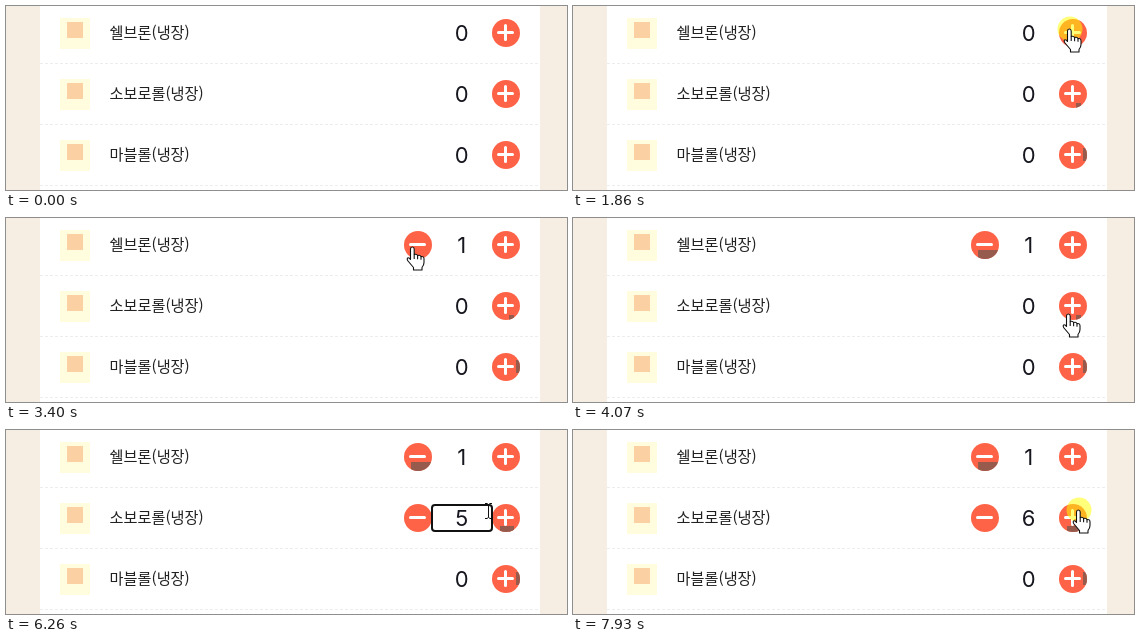
Recreate the animation shown at these times as an HTML page. Size 561x184 px, loop 7990 ms.

```html
<!DOCTYPE html>
<html lang="ko">
<head>
<meta charset="utf-8">
<style>
  html, body { margin: 0; width: 100%; height: 100%; overflow: hidden; background: #fff; }
  svg { display: block; }
  .name { font: 400 15.2px "Noto Sans CJK KR", "Noto Sans CJK", sans-serif; fill: #212121; }
  .count { font: 400 22px Inter, sans-serif; fill: #171720; text-anchor: middle; }
</style>
</head>
<body>
<svg width="561" height="184" viewBox="0 0 561 184">
  <defs>
    <clipPath id="disc"><circle r="14"/></clipPath>
  </defs>
  <rect width="561" height="184" fill="#f7eee3"/>
  <rect x="34" width="500" height="184" fill="#fff"/>
  <g id="rows"></g>
  <circle id="glow" r="12.5" fill="#ff0" fill-opacity=".52"/>
  <g id="hand" fill="#fff" stroke="#111" stroke-width="1.1" stroke-linejoin="round">
    <path d="M-2.5 12.5V2Q-2.5 0-.7 0T1.2 2V7.5Q4 6.8 4.6 8.6Q7.2 7.6 8 9.6Q11 9 11 11.8V15.5Q11 18 9 20.5V23H.5V20.5L-5 14Q-6.6 11.4-5 10.7Q-3.6 10.5-2.5 12.5Z"/>
    <path d="M1.2 7.5V12M4.6 8.6V12.3M8 9.6V12.8" fill="none"/>
  </g>
  <path id="arrow" d="M.5.5V16.5L4.2 13L6.7 18.8L9.2 17.7L6.8 12.1H11.8Z" fill="#fff" stroke="#111"/>
  <path id="beam" d="M-3-7.5H-1L.5-6.5L2-7.5H4M-3 7.5H-1L.5 6.5L2 7.5H4M.5-6.5V6.5" fill="none" stroke="#111"/>
</svg>
<script>
const LOOP = 7990, TICK = LOOP / 120;
const PRESS = 130, BLINK = 530;
const PLUS_X = 500, MINUS_X = 412, COUNT_X = 455.7;
const FOCUS = 4600, TYPED = 5600, BLUR = 7050;

const names = ['쉘브론(냉장)', '소보로롤(냉장)', '마블롤(냉장)'];
const clicks = [
  { t: 1860, row: 0, add: 1 },
  { t: 2190, row: 0, add: 1 },
  { t: 3270, row: 0, add: -1 },
  { t: FOCUS, row: 1, add: 0 },
  { t: 6980, row: 1, add: 1 },
  { t: 7930, row: 1, add: 1 }
];

// Pointer stops; each is reached from the one before
const stops = [
  { end: 860, x: 514, y: 160 },
  { start: 860, end: 1260, x: 497, y: 23 },
  { start: 2665, end: 3130, x: 407, y: 29 },
  { start: 3605, end: 4070, x: 496, y: 96 },
  { start: 4070, end: 4400, x: 460, y: 87 },
  { start: 6065, end: 6530, x: 519, y: 70 },
  { start: 6530, end: 6910, x: 506, y: 80 }
];

// Shaded patches the pointer leaves on buttons
const smudges = [
  { row: 2, kind: 'plus', t: 990, x: 10, y: -7, w: 4 },
  { row: 1, kind: 'plus', t: 1055, x: 3, y: 9, w: 5 },
  { row: 1, kind: 'plus', t: 4195, x: -6, y: 8, w: 14 },
  { row: 0, kind: 'minus', t: 3725, x: -7, y: 5, w: 21 }
];

const $ = id => document.getElementById(id);
const show = (el, on) => el.setAttribute('visibility', on ? 'visible' : 'hidden');
const rowY = i => 27 + 61 * i;

function button(row, kind) {
  const x = kind === 'plus' ? PLUS_X : MINUS_X;
  const patches = smudges.map((s, i) => s.row === row && s.kind === kind
    ? `<g clip-path="url(#disc)"><rect id="smudge${i}" x="${s.x}" y="${s.y}" width="${s.w}" height="13" fill="#965b4d"/></g>`
    : '').join('');
  const sign = 'M-7.5-.5H6.5' + (kind === 'plus' ? 'M-.5-7.5V6.5' : '');
  return `<g id="${kind}${row}" transform="translate(${x} ${rowY(row)})">
    <circle r="14" fill="#ff6347"/>${patches}
    <path d="${sign}" stroke="#fff" stroke-width="3" stroke-linecap="round"/></g>`;
}

function rowMarkup(name, i) {
  const y = rowY(i);
  return `<path d="M34 ${y + 30.5}H534" stroke="#ededed" stroke-dasharray="3 2"/>
    <rect x="54" y="${y - 15}" width="30" height="31" fill="#fffddd"/>
    <rect x="61" y="${y - 11}" width="16" height="16" fill="#fbd0a2"/>
    <text class="name" x="103.6" y="${y + 5}">${name}</text>
    ${button(i, 'minus')}${button(i, 'plus')}`;
}

$('rows').innerHTML = names.map(rowMarkup).join('') +
  '<rect id="field" x="426" y="75" width="60" height="26" rx="3" fill="#fff" stroke="#111" stroke-width="2"/>' +
  names.map((_, i) => `<text class="count" id="count${i}" x="${COUNT_X}" y="${rowY(i) + 8}"></text>`).join('') +
  '<rect id="caret" y="76" width="1" height="24" fill="#111"/>';

function countAt(row, t) {
  const typed = row === 1 && t >= TYPED ? 5 : 0;
  return clicks.filter(c => c.row === row && t >= c.t + PRESS)
    .reduce((sum, c) => sum + c.add, typed);
}

function pointer(t) {
  const next = stops.findLastIndex(s => t >= s.start);
  if (next < 1) return stops[0];
  const a = stops[next - 1], b = stops[next];
  const u = Math.min(1, (t - b.start) / (b.end - b.start));
  const e = u * u * (3 - 2 * u);
  return { x: Math.round(a.x + (b.x - a.x) * e), y: Math.round(a.y + (b.y - a.y) * e) };
}

function pointerKind({ x, y }, counts) {
  const row = counts.findIndex((_, i) => Math.abs(y - rowY(i)) <= 14);
  const near = (cx, reach) => Math.abs(x - cx) <= reach;
  if (row < 0) return 'arrow';
  if (near(PLUS_X, 14) || counts[row] > 0 && near(MINUS_X, 14)) return 'hand';
  return near(456, 31) ? 'beam' : 'arrow';
}

function draw(t) {
  const counts = names.map((_, i) => countAt(i, t));
  const focused = t >= FOCUS && t < BLUR;

  counts.forEach((n, i) => {
    $('count' + i).textContent = focused && i === 1 && !n ? '' : n;
    show($('minus' + i), n > 0);
  });
  smudges.forEach((s, i) => show($('smudge' + i), t >= s.t));

  const lastKey = t < TYPED ? FOCUS : TYPED;
  show($('field'), focused);
  show($('caret'), focused && Math.floor((t - lastKey) / BLINK) % 2 === 0);
  $('caret').setAttribute('x', t < TYPED ? 456 : 462);

  // The pointer advances in fixed ticks
  const p = pointer(Math.floor((t + 6) / TICK) * TICK + 1);
  const at = `translate(${p.x} ${p.y})`;
  const kind = t >= stops[0].end ? pointerKind(p, counts) : '';
  for (const id of ['hand', 'arrow', 'beam']) {
    $(id).setAttribute('transform', at);
    show($(id), id === kind);
  }
  $('glow').setAttribute('transform', at);
  show($('glow'), clicks.some(c => t >= c.t && t < c.t + PRESS));
}

const begin = performance.now();
function loop() {
  draw(Math.max(0, performance.now() - begin) % LOOP);
  requestAnimationFrame(loop);
}
draw(0);
requestAnimationFrame(loop);
</script>
</body>
</html>
```
